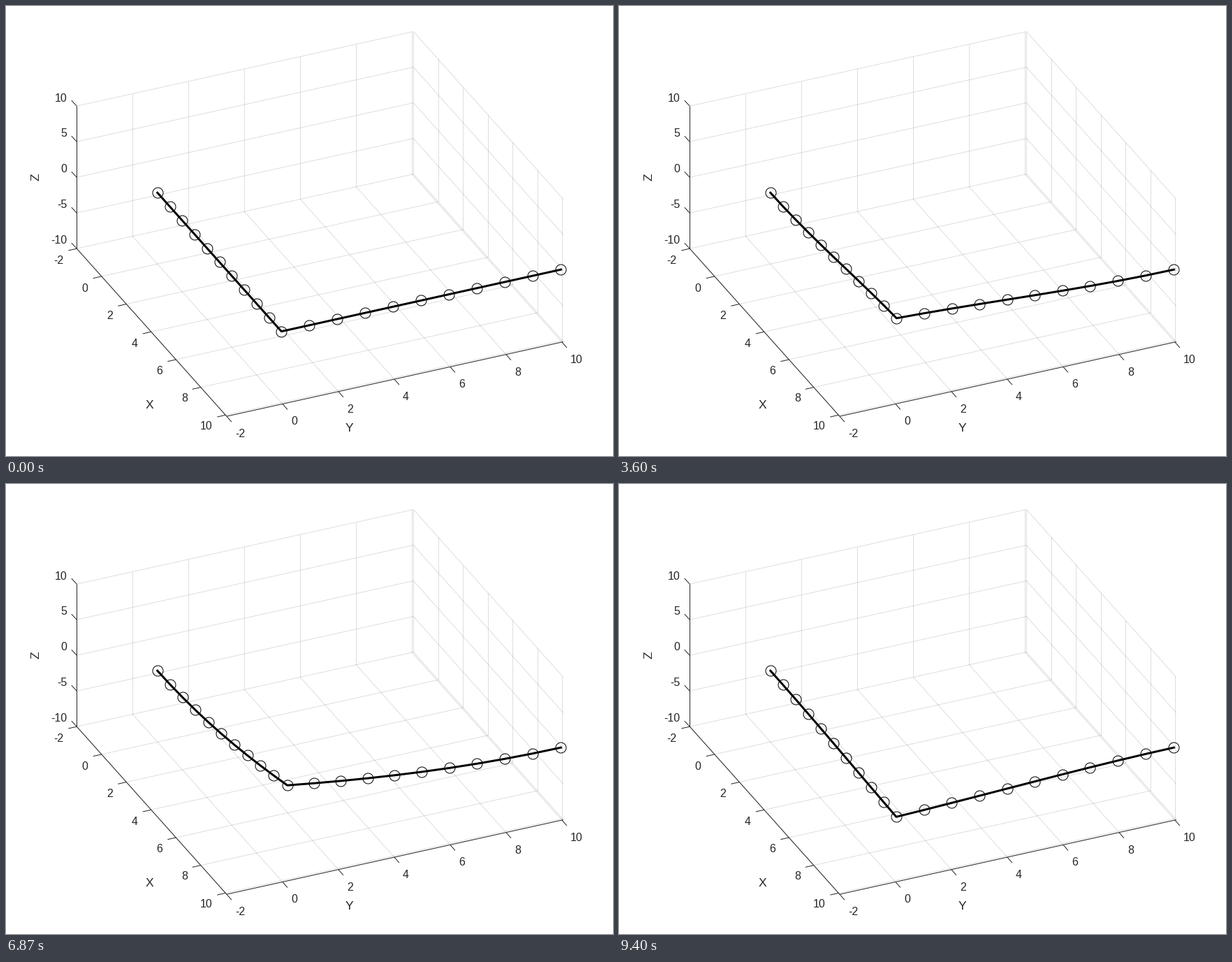
Animation, 869 px wide and 644 px high, one loop 9470 ms. Source, as a matplotlib script:

```python
import numpy as np
import matplotlib.pyplot as plt
from matplotlib.animation import FuncAnimation
from matplotlib.collections import LineCollection

W, H, DPI = 869, 644, 100
LOOP, POSES = 9470, 142
DRAWS = 2 * POSES                 # a finer clock than the pose changes
PT = 72 / DPI                     # points per pixel
X0, X1, Y0, Y1, Z0, Z1 = -2, 10.09, -2, 10.05, -10, 10
LEN, N = 10, 10                   # leg length, elements per leg
INK = (0.15, 0.15, 0.15)

plt.rcParams["font.family"] = "Liberation Sans"


def project(x, y, z):
    """Parallel projection of the box to stage pixels."""
    return (101.3 + 17.75 * (x + 2) + 40 * (y + 2),
            347.2 + 19.85 * (x + 2) - 8.85 * (y + 2) - 10.2 * (z + 10))


def segment(a, b):
    return [project(*a), project(*b)]


fig = plt.figure(figsize=(W / DPI, H / DPI), dpi=DPI, facecolor="white")
ax = fig.add_axes([0, 0, 1, 1])
ax.set_xlim(0, W)
ax.set_ylim(H, 0)
ax.axis("off")


def add_lines(lines, color, width):
    ax.add_collection(LineCollection(lines, colors=[color],
                                     linewidths=width * PT))


def label(x, y, text, size=16, **kw):
    ax.text(x, y, text, fontsize=size * PT, color=INK,
            va="center" if "rotation" in kw else "center_baseline", **kw)


def draw_box():
    ticks = range(-2, 11, 2)
    heights = range(-10, 11, 5)
    grid = []
    for v in ticks:
        grid += [segment((v, Y0, Z0), (v, Y1, Z0)),
                 segment((v, Y1, Z0), (v, Y1, Z1)),
                 segment((X0, v, Z0), (X1, v, Z0)),
                 segment((X0, v, Z0), (X0, v, Z1))]
    for z in heights:
        grid.append(segment((X0, Y1, z), (X1, Y1, z)))
        if z > Z0:
            grid.append(segment((X0, Y0, z), (X0, Y1, z)))
    add_lines(grid, INK + (0.15,), 1)

    axes = [segment((X0, Y0, Z0), (X0, Y0, Z1)),
            segment((X0, Y0, Z0), (X1, Y0, Z0)),
            segment((X1, Y0, Z0), (X1, Y1, Z0))]

    def tick(point, dx, dy):
        px, py = project(*point)
        axes.append([(px, py), (px + dx, py + dy)])

    for v in ticks:
        tick((v, Y0, Z0), -12, 2.7)
        tick((X1, v, Z0), 7, 8)
        label(82 + 17.8 * (v + 2), 363 + 19.75 * (v + 2), str(v), ha="right")
        label(328 + 40 * (v + 2), 611 - 8.83 * (v + 2), str(v), ha="left")
    for z in heights:
        tick((X0, Y0, z), -7.5, -8)
        label(87.5, 232 - 10.15 * z, str(z), ha="right")
    add_lines(axes, INK, 1)

    label(205, 570, "X", 17.5, ha="center")
    label(491, 603, "Y", 17.5, ha="center")
    label(42.8, 245, "Z", 17.5, ha="center", rotation=90)


def steady(t):
    psi = 2.004 * (t - 1.07)
    return 0.4 + 3.75 * np.cos(psi) + 0.3 * np.sin(2 * psi)


DECAY = 1.5
START = -steady(0)
RATE = START * DECAY - (steady(1e-4) - steady(-1e-4)) / 2e-4


def elbow(t):
    """Height and slope of the elbow, starting from rest."""
    lift = steady(t) + (START + RATE * t) * np.exp(-DECAY * t)
    ripple = 0.075 * np.sin(4.86 * t) * (1 - np.exp(-3 * t))
    return lift, 0.131 * lift + ripple


def bend(u, tip, slope):
    return tip * (3 * u**2 - 2 * u**3) + LEN * slope * (u**3 - u**2)


def bend_slope(u, tip, slope):
    return tip / LEN * 6 * (u - u**2) + slope * (3 * u**2 - 2 * u)


NODES = np.linspace(0, 1, N + 1)
MIDS = (NODES[1:] + NODES[:-1]) / 2


def frame_shape(t):
    """Both clamped legs, mirror images that keep their length."""
    lift, slope = elbow(t)
    turn = slope**2 / 1.8
    rise = bend_slope(MIDS, lift, slope)
    pull = 0.0
    for _ in range(8):
        side = bend_slope(MIDS, pull, turn)
        loss = 1.1 * (1 - np.sqrt(1 - rise**2 - side**2))
        pull = loss.sum()
    along = np.concatenate([[0], np.cumsum(LEN / N - loss)])
    across = bend(NODES, pull, turn)
    z = bend(NODES, lift, slope)
    x = np.concatenate([along, (LEN - across)[-2::-1]])
    y = np.concatenate([across, (LEN - along)[-2::-1]])
    return project(x, y, np.concatenate([z, z[-2::-1]]))


draw_box()
beam, = ax.plot([], [], color="black", lw=3 * PT, solid_joinstyle="round",
                marker="o", markersize=15 * PT, markerfacecolor="none",
                markeredgecolor="black", markeredgewidth=1 * PT, zorder=5)


def update(i):
    pose = (i + 1) // 2 % POSES
    beam.set_data(*frame_shape(pose * LOOP / POSES / 1000))
    return beam,


anim = FuncAnimation(fig, update, frames=DRAWS, interval=LOOP / DRAWS,
                     repeat=True, repeat_delay=0)
plt.show()
```
